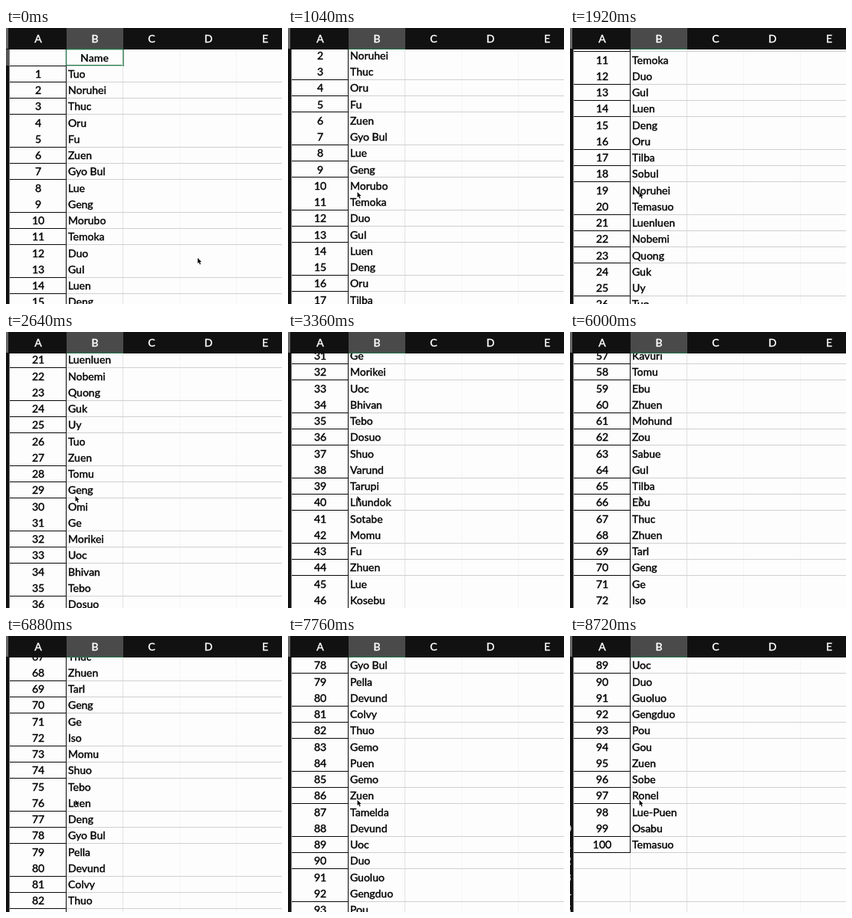
These frames come from a looping animation (360 px wide and 360 px high, 8.96 s). An HTML page with a canvas:

```html
<!DOCTYPE html>
<html lang="en">
<head>
<meta charset="utf-8">
<title>Scrolling sheet</title>
<style>
html, body { margin: 0; width: 100%; height: 100%; overflow: hidden; background: #fdfdfd; }
canvas { display: block; }
</style>
</head>
<body>
<canvas id="stage" width="360" height="360"></canvas>
<script>
const ctx = document.getElementById('stage').getContext('2d');
const LOOP = 8960, TICK = 80;
const PITCH = 21.25, FIRST_LINE = 48.8, TOP = 28;
const COLUMN = 74, LEFT = 4;
const INK = '#080808', GREEN = '#217346';

const people = ('Tuo,Noruhei,Thuc,Oru,Fu,Zuen,Gyo Bul,Lue,Geng,Morubo,' +
  'Temoka,Duo,Gul,Luen,Deng,Oru,Tilba,Sobul,Noruhei,Temasuo,' +
  'Luenluen,Nobemi,Quong,Guk,Uy,Tuo,Zuen,Tomu,Geng,Omi,' +
  'Ge,Morikei,Uoc,Bhivan,Tebo,Dosuo,Shuo,Varund,Tarupi,Lhundok,' +
  'Sotabe,Momu,Fu,Zhuen,Lue,Kosebu,Gou,Gou,Zhuen,Brell,' +
  'Faroun,Tuo,Oru,Tuy,Suen,Omi,Kavuri,Tomu,Ebu,Zhuen,' +
  'Mohund,Zou,Sabue,Gul,Tilba,Ebu,Thuc,Zhuen,Tarl,Geng,' +
  'Ge,Iso,Momu,Shuo,Tebo,Luen,Deng,Gyo Bul,Pella,Devund,' +
  'Colvy,Thuo,Gemo,Puen,Gemo,Zuen,Tamelda,Devund,Uoc,Duo,' +
  'Guoluo,Gengduo,Pou,Gou,Zuen,Sobe,Ronel,Lue-Puen,Osabu,Temasuo').split(',');

// Key points of the scroll: time in ms, position in px
const path = [
  [800, 0], [1520, 136], [1920, 230.8], [3360, 666.2],
  [3480, 666.2], [4480, 885.7], [6000, 1218.7], [7760, 1657.7], [8720, 1891.5]
];

const clamp = v => v < 0 ? 0 : v > 1 ? 1 : v;
const smooth = v => { const p = clamp(v); return p * p * (3 - 2 * p); };

// One long glide first, then a regular wheel notch: short glide, then rest
function wheel(t) {
  const start = 3480, period = 304, glide = 140;
  const x = (t - start) / period;
  if (x < 0) return x;
  const turns = Math.floor(x);
  return turns + smooth((x - turns) * period / glide);
}

function scrollAt(t) {
  const i = path.findIndex(([time]) => t < time);
  if (i < 0) return path[path.length - 1][1];
  if (i === 0) return 0;
  const [t0, s0] = path[i - 1], [t1, s1] = path[i];
  return s0 + (s1 - s0) * (wheel(t) - wheel(t0)) / (wheel(t1) - wheel(t0));
}

function rect(color, x, y, w, h) {
  ctx.fillStyle = color;
  ctx.fillRect(x, y, w, h);
}

function label(text, x, y, align, color = '#000', weight = 400) {
  ctx.font = `${weight} 14px Lato, Inter, sans-serif`;
  ctx.textAlign = align;
  ctx.fillStyle = ctx.strokeStyle = color;
  ctx.lineWidth = 0.4;
  ctx.fillText(text, x, y);
  if (weight === 400) ctx.strokeText(text, x, y);
}

function drawRow(k, scroll) {
  const bottom = FIRST_LINE + k * PITCH - scroll;
  const line = Math.floor(bottom);
  const base = bottom - 5.2;
  const listed = k <= people.length;
  // Hairlines are thinner than a pixel, so every fourth one drops out
  if (bottom - line < 0.75) {
    rect('#d0d0d0', 5, line, 355, 1);
    if (listed) rect(INK, 5, line, COLUMN, 1);
  }
  if (listed && k > 0) {
    rect(INK, LEFT + COLUMN, line - 21, 1, 22);
    label(k, 42, base, 'center');
    label(people[k - 1], 81, base, 'left');
  }
  if (k >= 99) label((k + 1) % 10, 1.5, base, 'right', '#ddd');
}

function drawCursor(x, y) {
  ctx.beginPath();
  ctx.moveTo(x, y);
  for (const [dx, dy] of [[0, 7], [1.6, 5.6], [2.8, 8.4], [4, 7.9], [2.9, 5.2], [5, 5]])
    ctx.lineTo(x + dx, y + dy);
  ctx.closePath();
  ctx.lineWidth = 1;
  ctx.strokeStyle = '#fff';
  ctx.stroke();
  ctx.fillStyle = '#000';
  ctx.fill();
}

function drawSelection(y) {
  rect('#555', 0, y, 4, 21);
  rect(INK, 5, y + 21, COLUMN, 1);
  label('Name', 115.5, y + 15.5, 'center', '#000', 700);
  ctx.strokeStyle = GREEN;
  ctx.lineWidth = 1.3;
  ctx.strokeRect(78.5, y - 0.3, 74.5, 21);
  rect('#fdfdfd', 151.5, y + 19, 3, 3);
  rect(GREEN, 152, y + 19.5, 2, 2);
}

function drawHeader() {
  rect('#111', 0, 0, 360, TOP);
  rect('#666', 0, 0, 3, TOP - 1);
  rect('#4a4a4a', LEFT + COLUMN + 1, 0, COLUMN, TOP);
  rect(GREEN, LEFT + COLUMN + 1, TOP - 1, COLUMN, 1);
  [...'ABCDE'].forEach((c, i) => label(c, 42 + i * COLUMN, 18.5, 'center', '#fff'));
}

function drawSheet(scroll) {
  rect('#fdfdfd', 0, 0, 360, 360);
  rect('#111', 0, 0, LEFT, 360);
  rect('#888', LEFT, 0, 1, 360);
  for (let i = 1; i < 5; i++)
    rect(i < 3 ? '#e2e2e2' : '#f5f5f5', LEFT + i * COLUMN, 0, 1, 360);

  const first = Math.floor((scroll - 20) / PITCH);
  for (let k = first < 0 ? 0 : first; k < first + 20; k++) drawRow(k, scroll);
  if (scroll < 30) drawSelection(TOP - scroll);
  drawHeader();
}

function frame(now) {
  const t = Math.floor((now % LOOP) / TICK) * TICK;
  drawSheet(scrollAt(t));
  const move = smooth(t / 720);
  drawCursor(250 - 159.5 * move, 300 - 86 * move);
  requestAnimationFrame(() => frame(performance.now() - begin));
}

const begin = performance.now();
frame(0);
</script>
</body>
</html>
```
